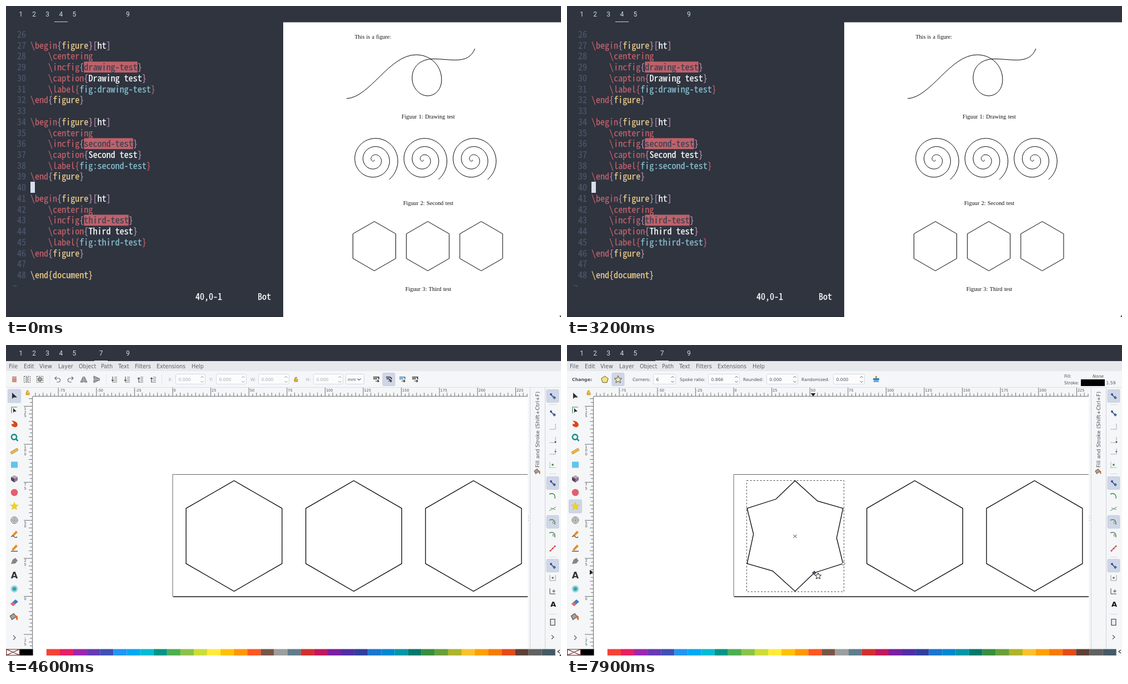
Animation of 999x561 px, one loop 8 s. Source, as an HTML page:

```html
<!DOCTYPE html>
<html lang="en">
<head>
<meta charset="utf-8">
<title>Editing figures</title>
<style>
html, body { margin: 0; width: 100%; height: 100%; overflow: hidden; background: #2f343f; }
svg { display: block; width: 999px; height: 561px; }
text { white-space: pre; }
.mono { font-family: "Noto Sans Mono CJK JP", "Noto Sans Mono CJK SC", "Noto Sans Mono", monospace; }
.bar { font: 12px Roboto, sans-serif; fill: #d3dae3; text-anchor: middle; }
.tex { font-family: "Liberation Serif", serif; fill: #111; word-spacing: .8px; }
.ui { font-family: "DejaVu Sans", sans-serif; fill: #4b5059; }
.hit { font-weight: bold; text-decoration: underline; }
</style>
</head>
<body>
<svg id="stage" viewBox="0 0 999 561"></svg>
<script>
const LOOP = 8000, BG = '#2f343f', PANEL = '#f5f6f8';
const svg = document.getElementById('stage');

function el(tag, attrs, parent = svg, text) {
  const node = document.createElementNS('http://www.w3.org/2000/svg', tag);
  for (const k in attrs) node.setAttribute(k, attrs[k]);
  if (text !== undefined) node.textContent = text;
  return parent.appendChild(node);
}
const group = (parent = svg, attrs = {}) => el('g', attrs, parent);
const rect = (p, x, y, width, height, fill, more) => el('rect', { x, y, width, height, fill, ...more }, p);
const path = (p, d, stroke = '#000', w = 1, fill = 'none') => el('path', { d, stroke, 'stroke-width': w, fill }, p);
const label = (p, cls, x, y, size, s, more) => el('text', { class: cls, x, y, 'font-size': size, ...more }, p, s);
const show = (node, on) => node.setAttribute('display', on ? 'inline' : 'none');
const move = (node, x, y) => node.setAttribute('transform', `translate(${x} ${y})`);
const poly = pts => 'M' + pts.map(p => p.map(v => v.toFixed(2)).join()).join('L') + 'Z';
const polar = (cx, cy, r, deg) => [cx + r * Math.cos(deg * Math.PI / 180), cy + r * Math.sin(deg * Math.PI / 180)];
const hexagon = (cx, cy, r) => poly([0, 1, 2, 3, 4, 5].map(i => polar(cx, cy, r, i * 60 - 90)));

// Font size that gives the monospace family the wanted advance
const probe = document.createElement('canvas').getContext('2d');
probe.font = '100px "Noto Sans Mono CJK JP","Noto Sans Mono CJK SC","Noto Sans Mono",monospace';
const sizeFor = advance => advance * 100 / probe.measureText('0').width;

rect(svg, 0, 0, 999, 561, BG);
rect(svg, 0, 560, 999, 1, '#242831');

/* ---------- editor and document ---------- */
const desk = group(), CW = 8.03, LH = 19.73, mono = sizeFor(CW);
const INK = { r: '#bf616a', p: '#b48ead', y: '#ebcb8b', c: '#88c0d0', w: '#ffffff', d: '#3b4252', n: '#4c566a' };
const code = (x, y, ink, s) =>
  label(desk, 'mono', x, y, mono, s, { fill: INK[ink], stroke: INK[ink], 'stroke-width': .25 });

function line(no, indent, ...parts) {
  const y = 57 + (no - 26) * LH;
  code(20, y, 'n', no);
  let x = 44 + indent * CW;
  for (let i = 0; i < parts.length; i += 2) {
    const w = parts[i + 1].length * CW;
    if (parts[i] === 'd') rect(desk, x, y - 15.9, w, LH, INK.r);
    code(x, y, parts[i], parts[i + 1]);
    x += w;
  }
}
function figure(no, word) {
  const id = word.toLowerCase() + '-test';
  line(no, 0, 'r', '\\begin', 'p', '{', 'y', 'figure', 'p', '}[', 'w', 'ht', 'p', ']');
  line(no + 1, 4, 'r', '\\centering');
  line(no + 2, 4, 'r', '\\incfig', 'p', '{', 'd', id, 'p', '}');
  line(no + 3, 4, 'r', '\\caption', 'p', '{', 'w', word + ' test', 'p', '}');
  line(no + 4, 4, 'r', '\\label{', 'c', 'fig:' + id, 'r', '}');
  line(no + 5, 0, 'r', '\\end', 'p', '{', 'y', 'figure', 'p', '}');
}
[26, 33, 40, 47].forEach(no => line(no, 0));
figure(27, 'Drawing');
figure(34, 'Second');
figure(41, 'Third');
line(48, 0, 'y', '\\end{document}');
code(12, 511, 'n', '~');
code(341, 530, 'w', '40,0-1');
code(453, 530, 'w', 'Bot');
const block = rect(desk, 44, 317, 8, 20, '#d8dee9');
const hollow = rect(desk, 43.5, 317.5, 8, 19, 'none', { stroke: '#d8dee9' });

rect(desk, 499, 29.4, 500, 532, '#fff');
label(desk, 'tex', 627.5, 59, 10, 'This is a figure:');
['Drawing', 'Second', 'Third'].forEach((word, i) =>
  label(desk, 'tex', 760, [203, 359, 514][i], 10.3, `Figuur ${i + 1}: ${word} test`, { 'text-anchor': 'middle' }));
path(desk, 'M613,167C655,165 690,88 738,88C765,88 784,108 784,133C784,150 773,162 759,162C744,162 731,147 731,130C731,110 745,96 768,95.5C800,95 832,107 844,77');

// Three even turns, starting and ending at the same angle
let coil = 'M0,0';
for (let a = 0; a <= 1080; a += 6) coil += 'L' + polar(0, 0, 14.85 * a / 360, a + 52.7).map(v => v.toFixed(2));
for (let i = 0; i < 3; i++) {
  move(path(desk, coil), 662.8 + i * 88.5, 277.5);
  path(desk, hexagon(663 + i * 96.2, 433.2, 44.5));
}

/* ---------- picker ---------- */
const picker = group(), PW = 5.86, small = sizeFor(PW);
let lastQuery = null;
function fillPicker(query) {
  if (query === lastQuery) return;
  lastQuery = query;
  picker.replaceChildren();
  rect(picker, 350, 169, 299, 223, BG);
  rect(picker, 350, 217, 295, 29, '#282c36');
  rect(picker, 645, 217, 4, 29, '#434c5e');
  label(picker, 'mono', 364, 195, small, query, { fill: '#fff' });
  rect(picker, 364.3 + query.length * PW, 183, 1.5, 15, '#fff');
  ['Third Test', 'Drawing Test', 'Second Test']
    .filter(s => s.toLowerCase().includes(query))
    .forEach((s, i) => {
      const row = label(picker, 'mono', 382, 236 + i * 36.6, small, '', { fill: '#f3f4f5' });
      const parts = query ? s.split(new RegExp(`(${query})`, 'i')) : [s];
      parts.forEach((part, k) => el('tspan', k % 2 ? { class: 'hit' } : {}, row, part));
    });
}

/* ---------- drawing on the canvas ---------- */
const HEX = { x: 410.5, y: 344.5, r: 99.7, step: 215.5 };
function page(parent) {
  path(parent, 'M1200,453.5H300V233.5H1200', '#666');
  rect(parent, 301, 453, 900, 2, '#4a4a4a');
  for (let i = 1; i < 3; i++) path(parent, hexagon(HEX.x + i * HEX.step, HEX.y, HEX.r), '#000', 1.3);
  return path(parent, hexagon(HEX.x, HEX.y, HEX.r), '#000', 1.3);
}
function clip(id, x, y, w, h) {
  rect(el('clipPath', { id }), x, y, w, h, '#000');
  return { 'clip-path': `url(#${id})` };
}

const loading = group();
rect(loading, 0, 29, 999, 532, PANEL);
rect(loading, 47, 93, 279, 187, '#fff');
page(group(group(loading, clip('early', 47, 93, 279, 187)), { transform: 'translate(-319 -134)' }));

/* ---------- vector editor ---------- */
const app = group();
rect(app, 0, 29, 999, 532, PANEL);
rect(app, 0, 29, 999, 18, '#e7e8eb');
const menu = { File: 5, Edit: 32, View: 60, Layer: 94, Object: 131, Path: 171, Text: 202, Filters: 232, Extensions: 271, Help: 334 };
for (const name in menu) label(app, 'ui', menu[name], 41.5, 9.6, name, { style: 'fill:#5c616c' });
path(app, 'M0,76.5H999', '#dcdfe3');

rect(app, 48, 93, 891, 455, '#fff');
const canvas = group(app, clip('view', 48, 93, 891, 455));
const shape = page(canvas);

// Rulers: one unit is 25 mm
const UNIT = 68.6;
let ticks = 'M48,92.5H939M47.5,93V548';
for (let i = -36; i <= 93; i++) {
  const x = 300 + i * UNIT / 10, len = i % 10 ? (i % 2 ? 4 : 6) : 15;
  if (x > 48 && x < 939) ticks += `M${x.toFixed(1)},92v${-len}`;
  const y = 453.5 - i * UNIT / 10;
  if (y > 93 && y < 548) ticks += `M47,${y.toFixed(1)}h${-len}`;
}
path(app, ticks, '#4a4d52', .8);
for (let i = -3; i <= 9; i++) {
  label(app, 'ui', 301.5 + i * UNIT, 83.5, 6.6, i * 25);
  if (i > -2 && i < 6) [...String(i * 25)].forEach((ch, k) =>
    label(app, 'ui', 34.5, 460 - i * UNIT + k * 6.5, 6.6, ch, { 'text-anchor': 'middle' }));
}
const topMark = path(app, 'M-4.5,87H4.5L0,92.5Z', 'none', 0, '#222');
const leftMark = path(app, 'M41,-4.5V4.5L47,0Z', 'none', 0, '#222');

// Icons
const icon = (p, x, y, d, fill = 'none', stroke = '#45484e', w = 1.2) => {
  const node = path(p, d, stroke, w, fill);
  move(node, x, y);
  return node;
};
const active = (p, x, y, w = 22, h = 23) => rect(p, x - w / 2, y - h / 2, w, h, '#cfd6e6', { rx: 2, stroke: '#bcc5d8', 'stroke-width': .7 });
const dot = r => `M${-r},0a${r},${r} 0 1 0 ${2 * r},0a${r},${r} 0 1 0 ${-2 * r},0Z`;
const star = (r, k = .45) => poly([...Array(10)].map((_, i) => polar(0, 0, i % 2 ? r * k : r, i * 36 - 90)));
const box = (w, h) => `M${-w / 2},${-h / 2}h${w}v${h}h${-w}Z`;
const ARROW = 'M-4,-6V5L-1,2.5H5Z';
const LOCK = 'M-3,0h6v4h-6ZM-2,0v-2a2,2 0 0 1 4,0';
const BUCKET = 'M-6,-1L0,-5L4,0L-3,5Z';
function bucket(x, y, k) {
  const g = group(app, { transform: `translate(${x} ${y}) scale(${k})` });
  icon(g, 0, 0, BUCKET, '#a9a19b', '#6b625c');
  icon(g, 5, 2, 'M-2,-4q5,0 3,8q-3,0 -3,-8Z', '#e06a28', 'none');
}

// Tool box
const pickTool = active(app, 15, 92, 23, 24), starTool = active(app, 15, 291, 23, 24);
icon(app, 15, 92, ARROW, '#2c2e33', 'none');
icon(app, 15, 117, 'M-2,-3V5L0,3H4Z', '#222', 'none');
icon(app, 15, 117, 'M-5,6V-5H5', 'none', '#3d8b50');
icon(app, 15, 142, 'M-5,-6Q6,-4 6,2Q5,7 0,6Q-6,5 -5,0Q-1,2 -1,-1Z', '#d9481c', 'none');
icon(app, 14.5, 166, dot(4.6) + 'M3,3L7,7', 'none', '#15918c', 2.6);
icon(app, 15, 191, 'M-7,2L5,-5L7,-1L-5,6Z', '#e8b84a', '#a97e22', .7);
rect(app, 9, 210.5, 12, 11, '#62c4ea');
icon(app, 15, 241, 'M0,-6L6,-3L0,0L-6,-3Z', '#b9a3b8', 'none');
icon(app, 15, 241, 'M-6,-3L0,0V7L-6,3Z', '#55455a', 'none');
icon(app, 15, 241, 'M6,-3L0,0V7L6,3Z', '#8a7690', 'none');
icon(app, 15, 266, dot(6.3), '#e2606f', 'none');
icon(app, 15, 291, star(7.5), '#f2d21f', '#e0c01b', .6);
icon(app, 15, 316, dot(6) + dot(3.6) + dot(1.2), 'none', '#555', 1);
icon(app, 15, 341, 'M-5,3L3,-6L6,-3L-2,5Z', '#ee8a1d', 'none');
icon(app, 15, 341, 'M-6,5q4,-3 6,0t5,0', 'none', '#333');
icon(app, 15, 366, 'M-5,3L3,-6L6,-3L-2,5Z', '#ee8a1d', 'none');
icon(app, 15, 366, 'M-6,6H6', 'none', '#333');
icon(app, 15, 390, 'M-6,5L-3,-3L2,-6L6,-1L2,4Z', '#8b857f', 'none');
label(app, 'ui', 15, 421, 16, 'A', { 'text-anchor': 'middle', 'font-weight': 'bold', style: 'fill:#333' });
icon(app, 15, 440, dot(6.4), '#9bd6da', 'none');
icon(app, 15, 440, dot(3.4), '#3ba0ab', 'none');
icon(app, 15, 465, 'M-7,2L2,-6L7,-2L-2,6Z', '#3a7fc4', 'none');
icon(app, 15, 465, 'M-7,2L-3,-1.5L2,2.5L-2,6Z', '#e8696b', 'none');
bucket(14, 490, 1.1);
icon(app, 15, 528, 'M-2,-4L2,0L-2,4', 'none', '#55585f');
icon(app, 39, 86, LOCK, '#e8b92d', '#c79516', .9);

// Dock
path(app, 'M943.5,77V548M970.5,77V548', '#cfd2d8');
label(app, 'ui', 0, 0, 9.5, 'Fill and Stroke (Shift+Ctrl+F)', { transform: 'translate(960 221) rotate(-90)' });
bucket(956, 228, .85);
[308, 312, 316].forEach(y => rect(app, 940, y, 1, 1, '#999'));

// Snap bar
[92, 249, 319, 398].forEach(y => active(app, 984, y));
[107.5, 232.5, 382.5, 485.5].forEach(y => path(app, `M978,${y}h13`, '#d5d8dd'));
[92, 123, 249, 398].forEach(y => {
  icon(app, 984, y, 'M-4,-3L4,4', 'none', '#333');
  icon(app, 981, y - 3, dot(1.9), '#2b3fd0', 'none');
  icon(app, 987, y + 3, 'M0,-3L3,0L0,3L-3,0Z', '#3f6d94', 'none');
});
[147, 171, 192].forEach((y, i) => {
  const p = icon(app, 984, y, 'M-5,5H5V-5', 'none', '#666', 1);
  p.setAttribute('stroke-dasharray', '1.5 1.5');
  if (i) icon(app, 989, y + (i === 1 ? 4 : 0), dot(1.6), i === 1 ? '#555' : '#4b7fa5', 'none');
});
icon(app, 984, 216, 'M-5,5H5M-5,5V-5', 'none', '#777', 1).setAttribute('stroke-dasharray', '1.5 1.5');
[216, 420].forEach(y => icon(app, 984, y, dot(1.8), '#3b8a46', 'none'));
[272, 319, 342].forEach(y => icon(app, 984, y, 'M-6,-3C1,-6 5,-2 4,5', 'none', y === 272 ? '#2f8d3b' : '#5f7d68', 1.4));
[319, 342].forEach(y => icon(app, 986, y + 1, box(3, 3), '#fff', '#3b8a46', .9));
icon(app, 984, 295, 'M-6,4L6,-3M-4,-1L5,2', 'none', '#5a8f60', 1);
icon(app, 984, 367, 'M-5,5L5,-5', 'none', '#d33c3c', 1.2);
[-4, 0, 4].forEach(k => icon(app, 984 + k, 367 - k, dot(1.6), '#c94f4f', 'none'));
icon(app, 984, 420, 'M-5,-5V5H5V-5', 'none', '#888', .8);
icon(app, 984, 444, 'M-5,-5V5H5M-1,0H5M2,-3V3', 'none', '#444', 1);
label(app, 'ui', 985, 472, 13, 'A', { 'text-anchor': 'middle', 'font-weight': 'bold', style: 'fill:#111' });
icon(app, 984, 500, box(8, 11), '#eee', '#333', 1.1);
icon(app, 984, 527, 'M-2,-3.5L2,0L-2,3.5', 'none', '#55585f');

// Palette
const HUES = ('f44336 e91e63 9c27b0 673ab7 3f51b5 2196f3 03a9f4 00bcd4 009688 4caf50 8bc34a cddc39 ffeb3b ' +
  'ffc107 ff9800 ff5722 795548 9e9e9e 607d8b d32f2f c2185b 7b1fa2 512da8 303f9f 1976d2 0288d1 0097a7 00796b ' +
  '388e3c 689f38 afb42b fbc02d ffa000 f57c00 e64a19 5d4037 616161 455a64').split(' ');
rect(app, 0, 548, 989, 13, '#fff');
['000000', 'ffffff', ...HUES].forEach((c, i) => rect(app, 24.6 + i * 24.1, 548.5, 24.2, 11.5, '#' + c));
path(app, 'M.5,549H24.5V559.5H.5ZM1,549L24,559.5M24,549L1,559.5', '#5d1a1a', 1.2);
icon(app, 995, 553, 'M2,-3L-2,0L2,3', 'none', '#333');

// Tool option bars
function field(p, x, w, value, dim) {
  rect(p, x + .5, 52.5, w - 1, 18, '#fcfcfd', { rx: 2, stroke: '#d6dae1' });
  label(p, 'ui', x + 5.5, 64.5, 7.7, value, dim ? { style: 'fill:#a4a8af' } : {});
  icon(p, x + w - 6, 62, 'M-2.5,-3L0,-5.5L2.5,-3M-2.5,3L0,5.5L2.5,3', 'none', dim ? '#90949b' : '#5c616c', 1);
}
const selectBar = group(app), starBar = group(app);
icon(selectBar, 15, 62, 'M-4,-4H4M-4,-1.3H4M-4,1.4H4M-4,4H4', 'none', '#b5563f', 1.6);
[38, 61].forEach(x => {
  icon(selectBar, x, 62, box(11, 11), 'none', '#444', 1).setAttribute('stroke-dasharray', '2 1.5');
  icon(selectBar, x, 62, x === 38 ? 'M-3,-3H3M-3,0H3M-3,3H3' : dot(3.5), x === 38 ? 'none' : '#a9a4a0', '#444', 1);
});
icon(selectBar, 93, 62, 'M-2,-5L-5,-2L-2,1M-5,-2H1a3.5,3.5 0 0 1 0,7H-2', 'none', '#686c75');
icon(selectBar, 116, 62, 'M2,-5L5,-2L2,1M5,-2H-1a3.5,3.5 0 0 0 0,7H2', 'none', '#686c75');
icon(selectBar, 140, 62, 'M-1,-5V5H-6ZM1,-5V5H6Z', '#a5a8ad', '#555', .8);
icon(selectBar, 163, 62, 'M-5,-6L6,-1H-5ZM-5,6L6,1H-5Z', '#a5a8ad', '#555', .8);
[195, 218, 242, 265].forEach((x, i) => {
  const s = i < 2 ? 1 : -1;
  icon(selectBar, x, 62, 'M0,-1H5M0,-4H5M-4,5H5M0,2H5', 'none', '#777', 1);
  icon(selectBar, x, 62, `M-3,${-5 * s}V${3 * s}M-5,${s}L-3,${3 * s}L-1,${s}`, 'none', '#444', 1.1);
});
path(selectBar, 'M78.5,53V71M180.5,53V71M280.5,53V71', '#e3e5e9');
[['X:', 292, 305, 54], ['Y:', 366, 378, 55], ['W:', 440, 454, 56], ['H:', 540, 553, 54]].forEach(([s, x, fx, w]) => {
  label(selectBar, 'ui', x, 64.5, 7.7, s, { style: 'fill:#a4a8af' });
  field(selectBar, fx, w, '0.000', true);
});
icon(selectBar, 522, 62, LOCK, '#e0b43a', '#a8821e', .9);
rect(selectBar, 611.5, 52.5, 33, 18, '#fcfcfd', { rx: 2, stroke: '#cfd6e6' });
label(selectBar, 'ui', 615, 64.5, 7.7, 'mm');
icon(selectBar, 635.5, 62, 'M-3,-1.5L0,1.5L3,-1.5', 'none', '#5c616c', 1.1);
active(selectBar, 689, 62);
[666, 689, 713, 736].forEach((x, i) => {
  icon(selectBar, x, 62, i === 1 ? 'M-5,-4H1Q5,-4 5,0M-4,-1H0Q2,-1 2,2' : 'M-5,-4H5V0M-5,-1H2', 'none', i === 2 ? '#3a6d9c' : '#222', 1.5);
  icon(selectBar, x + 3, 65, 'M-4,0H1M0,-2L2,0L0,2', 'none', '#222', 1.2);
});

label(starBar, 'ui', 9, 64.5, 7.8, 'Change:', { 'font-weight': 'bold' });
icon(starBar, 68, 62.5, poly([0, 1, 2, 3, 4].map(i => polar(0, 0, 6.5, i * 72 - 90))), '#f6e27a', '#444', .9);
active(starBar, 92, 62);
icon(starBar, 92, 62.5, star(7), '#f6e9a8', '#444', .9);
[['Corners:', 118, 155, 41, '6'], ['Spoke ratio:', 203, 254, 57, '0.866'],
 ['Rounded:', 317, 359, 57, '0.000'], ['Randomized:', 422, 479, 57, '0.000']].forEach(([s, x, fx, w, v]) => {
  label(starBar, 'ui', x, 64.5, 7.7, s);
  field(starBar, fx, w, v);
});
rect(starBar, 555, 56, 3, 5, '#d9962c');
rect(starBar, 551, 60, 11, 3, '#2f7fc4');
icon(starBar, 556.5, 65, 'M-4,-2H4L5,2H-5Z', '#62aee6', 'none');
label(starBar, 'ui', 895, 58.5, 7.7, 'Fill:');
label(starBar, 'ui', 946, 58.5, 7.7, 'None', { 'font-style': 'italic' });
label(starBar, 'ui', 895, 71, 7.7, 'Stroke:');
rect(starBar, 925, 62, 43, 12, '#000');
label(starBar, 'ui', 970.5, 71, 7.7, '1.59');

// Selected star: dashed bounds, centre and handles
const marks = group(canvas);
rect(marks, 323.5, 244.5, 175, 200.5, 'none', { stroke: '#333', 'stroke-width': .9, 'stroke-dasharray': '3 3' });
icon(marks, 410.5, 345, 'M-3,-3L3,3M3,-3L-3,3', 'none', '#333', 1);
const DIAMOND = 'M0,-3L3,0L0,3L-3,0Z';
icon(marks, 497.5, 394.5, DIAMOND, '#fff', '#333', .9);
const knob = icon(marks, 0, 0, DIAMOND, '#8b95e8', '#223', .9);

/* ---------- workspace bar and pointers ---------- */
const bar = group();
rect(bar, 0, 0, 999, 29, BG);
const digits = [1, 2, 3, 4, 5, 7, 9].map(n => [n, label(bar, 'bar', 2.4 + n * 24.1, 18.5, 12, n)]);
const underline = rect(bar, 0, 28, 24, 1, '#c9ced8');
const arrow = path(svg, 'M0,0V12.5L3,9.8L5,14.3L7,13.4L5.1,9.2H8.6Z', '#000', 1, '#fff');
const starPointer = group();
path(starPointer, 'M-2,1H6M2,-3V5', '#222');
icon(starPointer, 9, 7, star(6), '#fff', '#111', 1);

/* ---------- timeline ---------- */
const QUERIES = [[2500, 'third'], [1900, 'thir'], [1700, 'thi'], [1500, 't'], [0, '']];
// [start, end, from, to], stepped every 100 ms
const MOVES = [
  [0, 0, [997.5, 558.5], [997.5, 558.5]],
  [6000, 6700, [713, 528], [470, 410]],
  [6900, 7400, [468, 411], [452, 418.5]],
  [7700, 7900, [452, 418.5], [443, 410]]
];
function pointerAt(t) {
  const [a, b, from, to] = MOVES.filter(m => t >= m[0]).pop();
  const k = b > a ? Math.min(1, (t - a) / (b - a)) : 1;
  const e = a === 6000 ? 1 - (1 - k) ** 2 : k;
  return from.map((v, i) => v + (to[i] - v) * e);
}

function draw(time) {
  const t = Math.floor(time / 100) * 100;
  const picking = t >= 900 && t < 3200, editing = t >= 4500, starring = t >= 6900;
  show(desk, t < 3500);
  show(picker, picking);
  show(block, !picking);
  show(hollow, picking);
  if (picking) fillPicker(QUERIES.find(q => t >= q[0])[1]);
  show(loading, t >= 4000 && !editing);
  show(app, editing);
  underline.setAttribute('x', t < 3500 ? 87 : 159);
  digits.forEach(([n, node]) => show(node, n !== 7 || t >= 3500));

  const [x, y] = pointerAt(t);
  move(arrow, x, y);
  move(starPointer, x, y);
  show(arrow, !starring);
  show(starPointer, starring);
  if (!editing) return;

  const moved = t >= 6000;
  show(topMark, moved);
  show(leftMark, moved);
  move(topMark, x, 0);
  move(leftMark, 0, y);
  show(pickTool, !starring);
  show(starTool, starring);
  show(selectBar, !starring);
  show(starBar, starring);
  show(marks, starring);

  // The inner handle follows the pointer while dragged
  const hx = t > 7700 ? x + 2 : HEX.x + 43.2, hy = t > 7700 ? y + 1 : HEX.y + 74.8;
  const r = Math.hypot(hx - HEX.x, hy - HEX.y);
  const turn = Math.atan2(hy - HEX.y, hx - HEX.x) * 180 / Math.PI;
  move(knob, hx, hy);
  shape.setAttribute('d', poly([...Array(12)].map((_, i) => i % 2
    ? polar(HEX.x, HEX.y, r, turn + (i - 5) * 30)
    : polar(HEX.x, HEX.y, HEX.r, i * 30 - 90))));
}

const began = performance.now();
function tick() {
  draw((performance.now() - began) % LOOP);
  requestAnimationFrame(tick);
}
tick();
</script>
</body>
</html>
```
